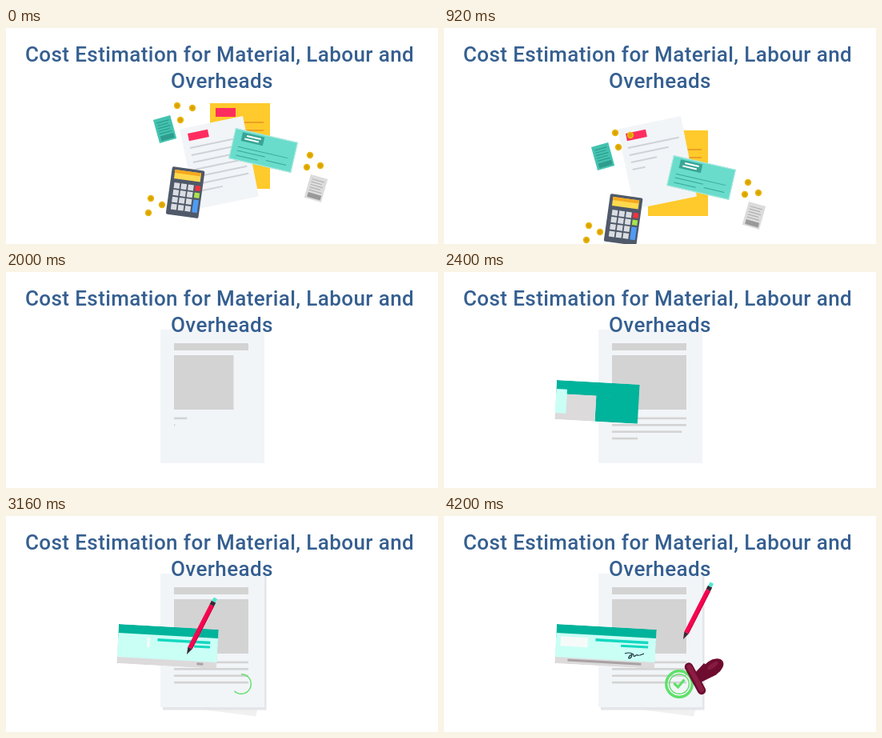
Recreate the animation shown at these times as an HTML page with a canvas. Size 540 by 270 pixels, loop 4.88 s.

```html
<!DOCTYPE html>
<html lang="en">
<head>
<meta charset="utf-8">
<title>Cost estimation</title>
<style>
html, body { margin: 0; width: 100%; height: 100%; overflow: hidden; background: #fff; }
canvas, svg { position: absolute; left: 0; top: 0; display: block; }
text { font: 500 26px Roboto, Inter, sans-serif; letter-spacing: .4px; fill: #355f90; text-anchor: middle; }
</style>
</head>
<body>
<canvas id="stage" width="540" height="270"></canvas>
<svg width="540" height="270">
  <text x="267" y="42">Cost Estimation for Material, Labour and</text>
  <text x="270" y="75">Overheads</text>
</svg>
<script>
const LOOP = 4880, STEP = 40;
const SHEET = '#f2f5f8', GREY = '#d3d3d3', GREEN = '#5fe06a';
const c = document.getElementById('stage').getContext('2d');

const clamp = v => Math.max(0, Math.min(1, v));
const ease = (t, start, span) => (1 - Math.cos(Math.PI * clamp((t - start) / span))) / 2;
const mix = (a, b, k) => a + (b - a) * k;
const mixAll = (a, b, k) => a.map((v, i) => mix(v, b[i], k));

function rect(x, y, w, h, color) {
  c.fillStyle = color;
  c.fillRect(x, y, w, h);
}

function poly(points, color) {
  c.beginPath();
  points.forEach(p => c.lineTo(...p));
  c.fillStyle = color;
  c.fill();
}

function line(x1, y1, x2, y2, width, color) {
  c.beginPath();
  c.moveTo(x1, y1);
  c.lineTo(x2, y2);
  c.lineWidth = width;
  c.strokeStyle = color;
  c.stroke();
}

function arc(x, y, r, part, width, color) {
  if (part <= 0) return;
  c.beginPath();
  c.arc(x, y, r, -Math.PI / 2, -Math.PI / 2 + part * 2 * Math.PI);
  c.lineWidth = width;
  c.strokeStyle = color;
  c.stroke();
}

function oval(x, y, rx, ry, color, turn = 0) {
  c.beginPath();
  c.ellipse(x, y, rx, ry, turn, 0, 2 * Math.PI);
  c.fillStyle = color;
  c.fill();
}

function at(x, y, degrees, draw) {
  c.save();
  c.translate(x, y);
  c.rotate(degrees * Math.PI / 180);
  draw();
  c.restore();
}

// Strokes a path up to a share of its length
function trace(d, length, part, width, color) {
  if (part <= 0) return;
  c.save();
  c.setLineDash([length * part, length * 2]);
  c.lineWidth = width;
  c.strokeStyle = color;
  c.stroke(new Path2D(d));
  c.restore();
}

// ---- First scene: papers, calculator and coins ----

const COINS = [[214, 97], [233, 100], [218, 115], [380, 159], [393, 172],
  [376, 174], [181, 213], [195, 221], [178, 231]];
const CORE = [226, 113, 289, 222];

function folder() {
  rect(255, 94, 75, 107, '#ffca2b');
  rect(262, 100, 25, 11, '#ff2d5f');
  [118, 128].forEach(y => line(262, y, 322, y, 2, '#eda024'));
}

function paper(t) {
  const [l, top, r, b] = mixAll([216, 109, 317, 228], CORE, ease(t, 1160, 200));
  c.save();
  c.beginPath();
  c.rect(l, top, r - l, b - top);
  c.clip();
  poly([[217, 126.5], [296, 110], [316, 210.4], [238, 226.5]], SHEET);
  c.restore();

  for (let i = 0; i < 7; i++) {
    const full = i < 6 ? 65 : 30;
    const length = Math.min(full, full - 0.16 * (t - 930 + 105 * i));
    if (length > 0) at(230 + 1.9 * i, 150 + 9 * i, -11.8, () => line(0, 0, length, 0, 2, '#cfd2d8'));
  }
  at(227, 132, -11.8, () => rect(0, 0, 25.5 * (1 - ease(t, 1140, 220)), 9.5, '#ff2d5f'));
}

function receipt(x, y, turn, fill, ink, block) {
  at(x, y, turn, () => {
    rect(0, 0, 22, 30, fill);
    for (let i = 0; i < 5; i++) line(3, 5 + i * 3.5, i % 2 ? 17 : 19, 5 + i * 3.5, 1, ink);
    rect(3, 22, 17, 6, block);
  });
}

function cheque() {
  at(287, 125, 13, () => {
    rect(0, 0, 80, 39, '#69dccb');
    c.lineWidth = 1;
    c.strokeStyle = '#b5e9e1';
    c.strokeRect(0.5, 0.5, 79, 38);
    rect(10, 3, 28, 11, '#3aa596');
    line(16, 6.5, 34, 6.5, 2, '#fff');
    line(14, 10.5, 32, 10.5, 2, '#fff');
    line(8, 22, 72, 22, 1, '#35a899');
    line(8, 27, 44, 27, 1, '#35a899');
    line(8, 33, 36, 33, 1, '#35a899');
    line(46, 31, 72, 31, 1, '#35a899');
  });
}

function calculator() {
  at(208, 173, 8, () => {
    c.beginPath();
    c.roundRect(0, 0, 41, 60, 2);
    c.fillStyle = '#4f5969';
    c.fill();
    rect(4, 3.5, 33, 11, '#ffd94f');
    rect(4, 3.5, 33, 4, '#f5a91f');
    for (let row = 0; row < 4; row++)
      for (let col = 0; col < 3; col++) rect(5.3 + 8.8 * col, 19.5 + 8.9 * row, 7, 7, '#dadde2');
    rect(32, 19.5, 6.5, 6.5, '#f4333d');
    rect(32, 28.4, 6.5, 6.5, '#a9e34b');
    rect(32, 37.3, 6.5, 16, '#4f9cf5');
  });
}

function coin(x, y, t) {
  oval(x, y, 4.2, 4.2, '#e9b50c');
  const spin = Math.abs(Math.cos(Math.PI * Math.min(t, 560) / 560));
  oval(x, y, 0.5 + 2 * spin, 2.5, '#d9a300');
}

function firstScene(t) {
  const drop = 199 * clamp((t - 560) / 560) ** 4;
  const falling = draw => at(0, drop, 0, draw);
  if (t < 1120) falling(folder);
  paper(t);
  if (t < 1120) falling(() => {
    receipt(184, 115, -15.5, '#43c3b0', '#2a9485', '#2f9c8d');
    receipt(381, 183, 16, '#dcdcdc', '#aaa', '#999');
    cheque();
    calculator();
    COINS.forEach(([x, y]) => coin(x, y, t));
  });
}

// ---- Second scene: document, signature and stamp ----

function sheet(t) {
  c.globalAlpha = ease(t, 2560, 280);
  poly([[200, 236], [312, 250.5], [316, 236]], '#f1f1f2');
  rect(196, 75, 129.5, 167.5, '#e3e6e9');
  c.globalAlpha = 1;
  const [l, top, r, b] = mixAll(CORE, [193, 72, 323, 239], ease(t, 1720, 240));
  rect(l, top, r - l, b - top, SHEET);

  rect(210, 89, 93 * ease(t, 1700, 300), 9, GREY);
  rect(210, 104, 93 * ease(t, 1760, 340), 68, GREY);
  [1890, 1970, 2064, 2240].forEach((start, i) =>
    rect(210, 181.6 + 8.4 * i, 93 * ease(t, start, 400), 2.6, GREY));
}

function slip(t) {
  const fromLeft = (y, h, start, color) => rect(0, y, 125 * ease(t, start, 480), h, color);
  const fromRight = (right, y, w, h, start, color) => {
    const part = w * ease(t, start, 400);
    rect(right - part, y, part, h, color);
  };
  at(141, 135, 3.2, () => {
    c.beginPath();
    c.rect(0, 0, 125, 49);
    c.clip();
    // Later layers replace the teal one, so no teal shows at their edges
    const grey = 125 * ease(t, 2190, 480);
    fromLeft(0, 17, 2050, '#00b39b');
    rect(grey, 16.5, Math.max(0, 125 * ease(t, 2050, 480) - grey), 32.5, '#00b39b');
    fromLeft(17, 32, 2190, '#dcdadb');
    fromLeft(11, 30, 2297, '#cafff6');
    fromRight(115.5, 15.3, 66, 3.5, 2740, '#14d8c0');
    fromRight(115.5, 21.2, 34, 3, 2937, '#14d8c0');
    fromRight(40, 15, 34, 12, 3080, '#f6fbf9');
    fromRight(108, 42.7, 92, 3, 3084, '#a9a2a4');
  });
  trace('M226 172q5-2 9 0q0 6-4 6q-1-1 2-4q4-3 4 0q0 3 3 0q2-1 2 0q1 1 8-2', 48,
    ease(t, 3180, 360), 1.2, '#17313a');
}

function seal(t) {
  arc(294, 210, 12.3, ease(t, 2870, 500), 1.4, GREEN);
  arc(294, 210, 16.2, ease(t, 3240, 360), 3.4, GREEN);
  trace('M287.5 209L292.5 214L300.5 204.5', 19.5, ease(t, 3640, 300), 3.2, GREEN);
}

function stamp(t) {
  const size = ease(t, 3380, 300);
  if (!size) return;
  c.save();
  c.translate(314, 203);
  c.scale(size, size);
  c.translate(-314, -203);
  c.lineCap = 'round';
  poly([[310, 200], [325, 184], [341, 198], [317, 210]], '#6e0c30');
  oval(335.5, 190, 15.5, 9.5, '#6e0c30', -0.6);
  oval(336, 187, 8, 3, '#861a40', -0.6);
  line(306, 188.5, 322, 218, 10.5, '#6b0d30');
  line(306.5, 188.5, 322, 217, 6, '#8c1c42');
  c.restore();
}

function pen(t) {
  let x = 226, y = mix(350, 173, ease(t, 2600, 400));
  const write = ease(t, 3180, 360), leave = ease(t, 3640, 400);
  x += 23 * write;
  y += 1.5 * Math.sin(write * 6 * Math.PI);
  x = mix(x, 299, leave);
  y = mix(y, 154, leave);
  at(x, y, -63, () => {
    poly([[0, 0], [9, -3], [9, 3]], '#3b2833');
    rect(9, -3, 60, 6, '#f5054f');
    rect(9, 1.8, 60, 1.2, '#d00045');
    rect(69, -3, 5, 6, '#3b2833');
    rect(74, -2.4, 5, 4.8, '#4fe6d2');
  });
}

function secondScene(t) {
  sheet(t);
  slip(t);
  seal(t);
  stamp(t);
  pen(t);
}

function frame() {
  const t = Math.floor(performance.now() % LOOP / STEP) * STEP;
  c.clearRect(0, 0, 540, 270);
  (t < 1720 ? firstScene : secondScene)(t);
  requestAnimationFrame(frame);
}
frame();
</script>
</body>
</html>
```
